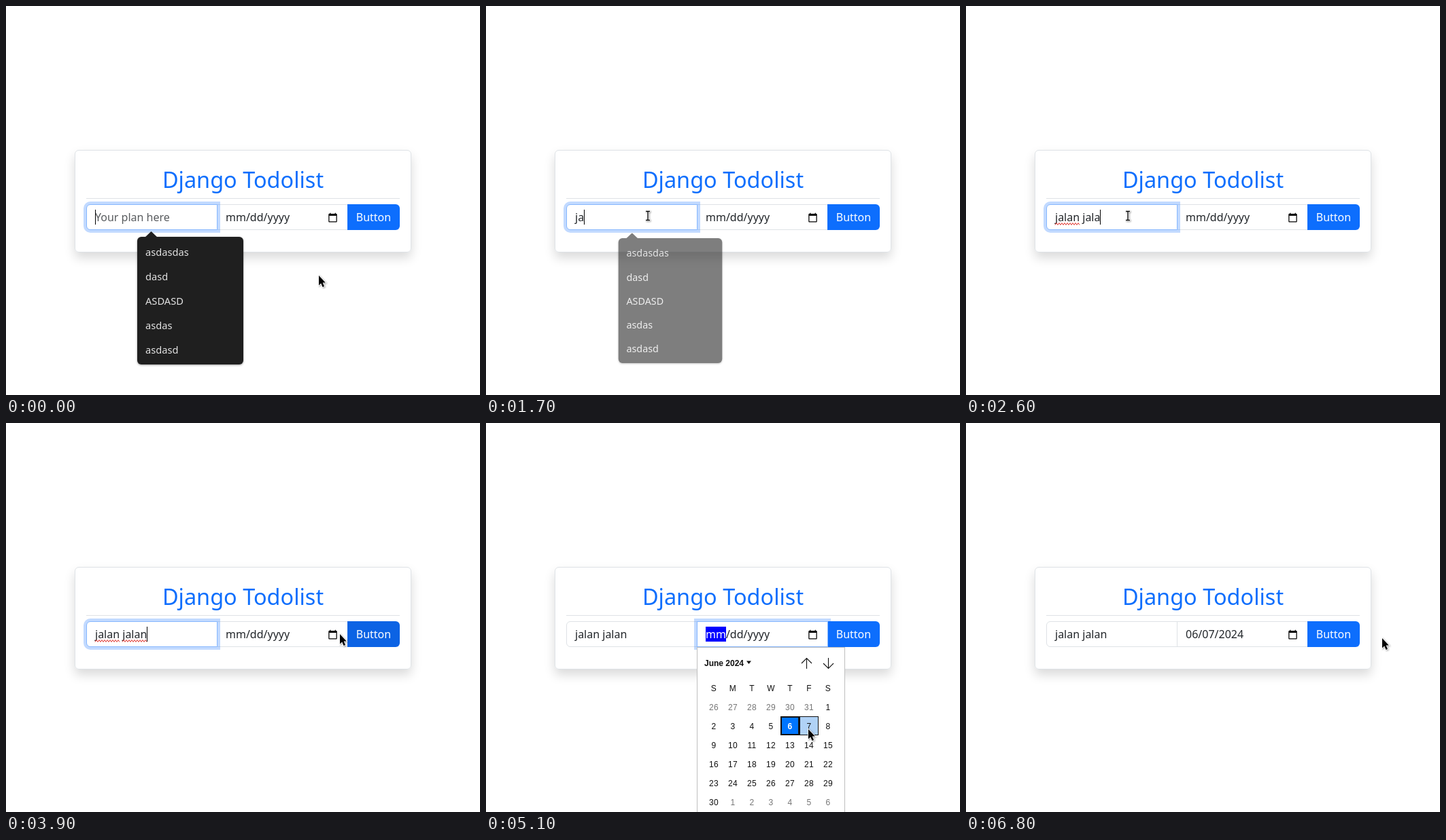
Animation, 697 px wide and 573 px high, one loop 8 s. Source, as an HTML page:

```html
<!DOCTYPE html>
<html lang="en">
<head>
<meta charset="utf-8">
<title>Todolist</title>
<style>
html, body { margin: 0; width: 100%; height: 100%; overflow: hidden; background: #fff; }
* { box-sizing: border-box; }
#stage { position: relative; width: 697px; height: 573px; overflow: hidden; font: 16px/24px "Noto Sans", sans-serif; color: #212529; }
#stage > *, .abs { position: absolute; }
#card { left: 101px; top: 212px; width: 495px; height: 151px; border: 1px solid #dee2e6; border-radius: 6px; box-shadow: 0 8px 16px rgba(0,0,0,.15); }
h1 { left: 101px; top: 237px; width: 495px; margin: 0; font-size: 32.45px; line-height: 38.94px; font-weight: 400; text-align: center; color: #0d6efd; }
#rule { left: 118px; top: 283px; width: 461px; height: 1px; background: #dee2e6; }
.field { top: 292px; width: 193px; height: 38px; padding: 6px 12px; border: 1px solid #dee2e6; background: #fff; white-space: pre; }
#plan { left: 118px; border-radius: 6px 0 0 6px; }
#date { left: 310px; }
#hint { left: 12px; top: 6px; color: rgba(33,37,41,.75); }
#caret { display: inline-block; width: 1px; height: 22px; margin-right: -1px; vertical-align: -5px; background: #000; }
#month.on { background: #00f; color: #fff; }
#button { left: 502px; top: 292px; width: 77px; height: 38px; line-height: 38px; z-index: 2; border-radius: 0 6px 6px 0; text-align: center; color: #fff; }
#wave { left: 0; top: 0; z-index: 6; }
#popup { left: 193px; top: 340px; width: 156px; height: 188px; padding: 4px 12px; z-index: 7; border-radius: 6px; background: #1f1f1f; color: #e3e3e3; font-size: 14.67px; line-height: 36px; box-shadow: 0 1px 3px rgba(0,0,0,.4); }
#popup::before { content: ""; position: absolute; left: 11px; top: -8px; width: 19px; height: 9px; background: #1f1f1f; clip-path: polygon(50% 0, 100% 100%, 0 100%); }
#calendar { left: 310px; top: 330px; width: 218px; height: 290px; z-index: 8; border: 1px solid #bfbfbf; background: #fff; color: #101010; font: 12px/28px "Liberation Sans", Arial, sans-serif; }
#calendar b { left: 10px; top: 9px; }
#days { left: 10px; top: 45px; width: 196px; display: grid; grid-template-columns: repeat(7, 28px); grid-auto-rows: 28px; line-height: 30px; letter-spacing: .3px; text-align: center; }
#days .out { color: #757575; }
#days .hover { background: #b0d2f6; box-shadow: inset 0 0 0 1px #101010; }
#days .today { background: #0075ff; color: #fff; font-weight: 700; box-shadow: inset 0 0 0 2px #101010; }
#pointer { left: 0; top: 0; z-index: 9; overflow: visible; filter: drop-shadow(1px 1px 1px rgba(0,0,0,.35)); }
</style>
</head>
<body>
<div id="stage">
  <div id="card"></div>
  <h1>Django Todolist</h1>
  <div id="rule"></div>
  <div id="plan" class="field"><span id="hint" class="abs">Your plan here</span><span id="typed"></span><span id="caret"></span></div>
  <div id="date" class="field"><span id="month"></span><span id="rest"></span>
    <svg class="abs" style="left:161.5px;top:10.5px" width="15" height="15" viewBox="0 0 24 24"><path d="M20 3h-1V1h-2v2H7V1H5v2H4c-1.1 0-2 .9-2 2v16c0 1.1.9 2 2 2h16c1.1 0 2-.9 2-2V5c0-1.1-.9-2-2-2zm0 18H4V8h16z"/></svg>
  </div>
  <div id="button">Button</div>
  <svg id="wave" width="697" height="573"><path fill="none" stroke="#e0312b"/></svg>
  <div id="popup"><div>asdasdas</div><div>dasd</div><div>ASDASD</div><div>asdas</div><div>asdasd</div></div>
  <div id="calendar">
    <b class="abs">June 2024</b>
    <svg class="abs" style="left:0;top:0" width="216" height="44" fill="none" stroke="#101010" stroke-width="1.1">
      <path d="M72 19.5h7l-3.5 4.5z" fill="#101010" stroke="none"/>
      <path d="M160.500 31V16M153 23l7.500-7.500l7.500 7.500M192.500 15v15.500M185 23l7.500 7.500l7.500-7.500"/>
    </svg>
    <div id="days" class="abs"></div>
  </div>
  <svg id="pointer" width="1" height="1">
    <path id="arrow" d="M0 0V14.500L3.200 11.400L5.600 17L8 16L5.700 10.500H9.800Z" stroke="#fff" stroke-width="1.600" paint-order="stroke"/>
    <g id="beam" fill="none"><path stroke="#fff" stroke-width="3" d="M-3.500-6.500H3.500M0-6.500V6.500M-3.500 6.500H3.500"/><path stroke="#000" stroke-width="1.300" d="M-3-6.500H3M0-6.500V6.500M-3 6.500H3"/></g>
  </svg>
</div>
<script>
const $ = id => document.getElementById(id);
const show = (el, on) => el.style.visibility = on ? "visible" : "hidden";
const clamp = (v, max) => Math.max(0, Math.min(max, v));
const mix = (a, b, f) => a + (b - a) * f;

// 0 before start, 1 once ms have passed
const ramp = (t, start, ms) => clamp((t - start) / ms, 1);
// 1 between two times, with a soft edge on both sides
const pulse = (t, from, to, rise = 200, fall = 200) => ramp(t, from, rise) - ramp(t, to, fall);
// letters typed since start, one every 100 ms, at most n
const burst = (t, start, n) => clamp(Math.floor((t - start) / 100) + 1, n);

// Pointer moves: arrival time, duration, x, y
const moves = [
  [0, 1, 460, 397], [600, 100, 234, 299], [900, 100, 238, 309],
  [3700, 500, 530, 313], [3900, 200, 491, 311], [4100, 200, 482, 316],
  [4800, 300, 505, 473], [5000, 100, 453, 452], [5100, 100, 474, 451],
  [5900, 500, 580, 345], [6200, 300, 552, 314], [6800, 300, 612, 317]
];
const pointerAt = t => moves.reduce(([px, py], [end, ms, x, y]) => {
  const f = ramp(t, end - ms, ms);
  return [mix(px, x, f), mix(py, y, f)];
}, [0, 0]);

const addCell = (text, cls = "") => {
  const cell = document.createElement("span");
  cell.textContent = text;
  cell.className = cls;
  return $("days").appendChild(cell);
};
[..."SMTWTFS"].forEach(d => addCell(d));
const cells = Array.from({ length: 42 }, (_, i) => {
  const date = new Date(2024, 4, 26 + i), day = date.getDate();
  return addCell(day, date.getMonth() !== 5 ? "out" : day === 6 ? "today" : "");
});

function zigzag(x, width) {
  let d = `M${x} 322.5`;
  for (let i = 1; i * 2 <= width; i++) d += `L${x + i * 2} ${i % 2 ? 319.5 : 322.5}`;
  return d;
}

function setFocus(el, f) {
  el.style.borderColor = `rgb(${mix(222, 134, f)},${mix(226, 183, f)},${mix(230, 254, f)})`;
  el.style.boxShadow = `0 0 0 4px rgba(13,110,253,${.25 * f})`;
  el.style.zIndex = f > .3 ? 5 : 1;
}

function drawPlan(t) {
  setFocus($("plan"), pulse(t, -200, 100) + pulse(t, 1000, 4000));
  const count = burst(t, 1700, 1) + burst(t, 1700, 4) + burst(t, 2200, 5) + burst(t, 3000, 1);
  $("typed").textContent = "jalan jalan".slice(0, count);
  show($("hint"), !count);
  show($("caret"), t < 200 || t >= 1100 && t < 4100);
  const misspelt = t >= 4100 ? 0 : (count > 5) + (t >= 3300);
  $("wave").firstChild.setAttribute("d", [131, 171].slice(0, misspelt).map(x => zigzag(x, 36)).join(""));

  const fade = (pulse(t, -200, 100) + pulse(t, 1000, 1600)) ** .8;
  $("popup").style.opacity = fade;
  $("popup").style.transform = fade < 1 ? `scale(${mix(.948, 1, fade)})` : "none";
}

function drawDate(t, x, y) {
  const picked = t >= 5400;
  setFocus($("date"), pulse(t, 4000, 6200));
  $("month").textContent = picked ? "06" : "mm";
  $("rest").textContent = picked ? "/07/2024" : "/dd/yyyy";
  $("month").className = t >= 4100 && t < 6300 ? "on" : "";
  show($("calendar"), t >= 4200 && !picked);
  const col = Math.floor((x - 321) / 28), row = Math.floor((y - 404) / 28);
  cells.forEach((c, i) => c.classList.toggle("hover", i === row * 7 + col));
}

function draw(t) {
  const [x, y] = pointerAt(t);
  drawPlan(t);
  drawDate(t, x, y);

  const pressed = t >= 6300 && t < 6400;
  const shade = pulse(t, 3600, 3850, 170, 150) + pulse(t, 6000, 6620, 170, 150) + (pressed ? .3 : 0);
  $("button").style.background = `rgb(${mix(13, 11, shade)},${mix(110, 94, shade)},${mix(253, 215, shade)})`;

  const beam = t >= 600 && x < 311;
  $("pointer").style.transform = `translate(${x}px,${y}px)`;
  show($("beam"), beam);
  show($("arrow"), !beam);
}

function tick() {
  draw(Math.floor(performance.now() % 8000 / 100) * 100);
  requestAnimationFrame(tick);
}
tick();
</script>
</body>
</html>
```
